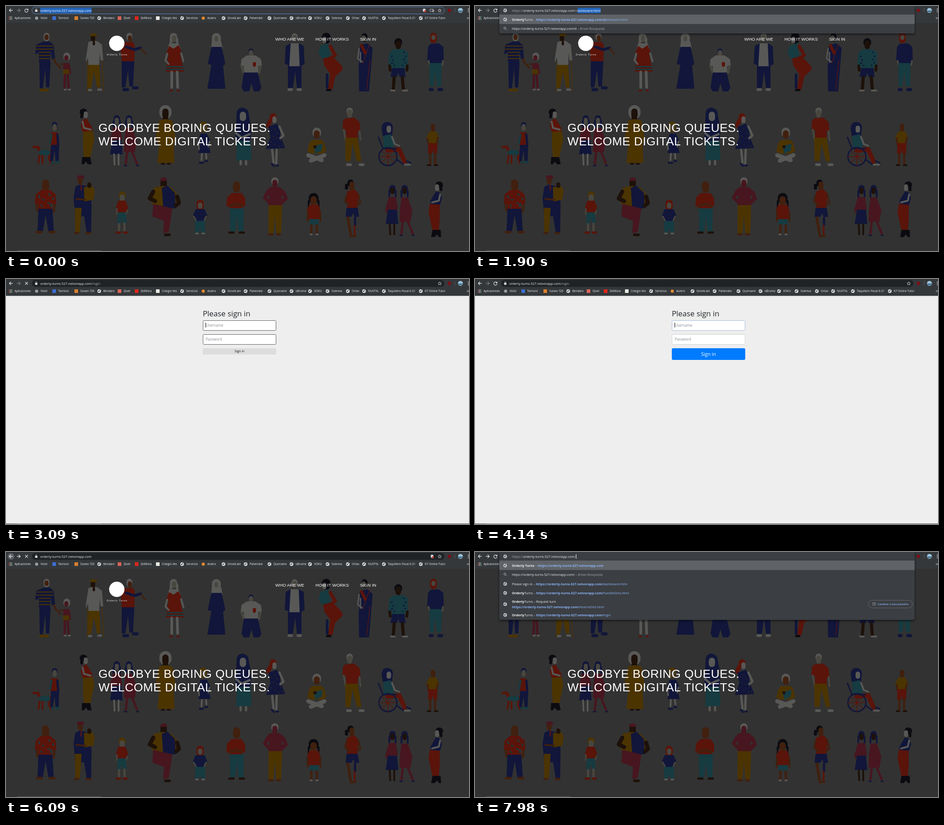
Animation, 1028 px wide and 545 px high, one loop 8 s. Source, as an HTML page:

```html
<!DOCTYPE html>
<html lang="es">
<head>
<meta charset="utf-8">
<title>Sign-in walk-through</title>
<style>
html, body { margin: 0; width: 100%; height: 100%; overflow: hidden; background: #323232; }
#stage { position: absolute; left: 0; top: 0; width: 1028px; height: 545px; overflow: hidden; font: 7.3px "Open Sans", "Noto Sans", sans-serif; color: #f1f3f4; }
#stage div, #stage svg { position: absolute; }
#stage svg { left: 0; top: 0; overflow: visible; }
.t { white-space: pre; line-height: 12px; }
.arial { font-family: "Liberation Sans", sans-serif; color: #fff; }
.slogan { letter-spacing: .5px; }
.label { letter-spacing: 1px; }
#home, #login { left: 0; top: 37px; width: 1028px; height: 508px; background: #323232; }
#login { background: #eee; }
#home > *, #login > * { margin-top: -37px; }
.box { box-sizing: border-box; left: 437px; width: 163px; border-radius: 2.5px; background: #fff; }
.field { height: 23px; border: 1px solid; }
#btn { top: 154px; text-align: center; }
#caret { left: 443px; top: 97px; width: 1px; height: 11px; background: #222; }
#panel { left: 54px; top: 0; width: 922px; background: #3b3e42; border-radius: 0 0 4px 4px; box-shadow: 0 2px 5px #0009; }
#hot { left: 0; top: 19px; width: 922px; height: 21px; background: #5f6367; }
i { font-style: normal; color: #a4a9ae; }
a { color: #8ab4f8; }
b { font-weight: 700; }
mark { background: #2265bd; color: #fff; padding: 1px 0; }
u { display: inline-block; width: 1px; height: 10px; margin-right: -1px; background: #fff; vertical-align: -2px; }
#pill { left: 819px; top: 107px; width: 97px; height: 16px; border: 1px solid #62666b; border-radius: 9px; }
</style>
</head>
<body>
<div id="stage">
  <div id="home">
    <svg id="crowd" width="1028" height="545"></svg>
    <div id="homeText"></div>
  </div>
  <div id="login">
    <div class="t" style="left:437px;top:66px;font-size:16.8px;line-height:22px;font-weight:500;color:#212529">Please sign in</div>
    <div class="box field" id="user" style="top:91.5px"></div>
    <div class="box field" id="pass" style="top:123px"></div>
    <div class="t" style="left:443.5px;top:96.5px;font-size:8.05px;color:#868c92">Username</div>
    <div class="t" style="left:443.5px;top:128px;font-size:8.05px;color:#868c92">Password</div>
    <div class="box" id="btn">Sign in</div>
    <div id="caret"></div>
    <div style="left:0;top:544px;width:1028px;height:1px;background:#444"></div>
  </div>
  <div style="left:25px;top:544px;width:186px;height:1px;background:#666"></div>
  <svg id="bar" width="1028" height="38"></svg>
  <div id="marks"></div>
  <div id="panel">
    <div id="hot"></div>
    <svg id="rowIcons" width="922" height="151"></svg>
    <div id="rows"></div>
    <div id="pill"><svg width="16" height="16"><path d="M9 5h6v5.500h-6zM12 5v2h3" fill="none" stroke="#9aa0a6" stroke-width=".8"/></svg>
      <div class="t" style="left:20px;top:1.500px;font-size:6px;font-weight:600;color:#8ab4f8">Cambiar a esta pestaña</div></div>
  </div>
  <div id="url" class="t" style="top:4px;font-size:7.4px"></div>
</div>
<script>
const $ = id => document.getElementById(id);
const show = (id, on) => { $(id).style.display = on ? '' : 'none'; };
const text = (x, y, html, size = 7.25, cls = '') =>
  `<div class="t ${cls}" style="left:${x}px;top:${y - 6}px;font-size:${size}px">${html}</div>`;

/* ---- crowd: "colour[stroke width] path" parts joined by | ---- */
const ink = { r: '#5a140a', n: '#11163a', y: '#4c3400', t: '#163b41', w: '#585856', g: '#48463f',
  b: '#1d110a', o: '#41200f', p: '#47161f', k: '#0b0b11', e: '#323232' };

const part = s => {
  const [, c, w, d] = s.match(/^(\w)([\d.]*) (.*)$/);
  return w
    ? `<path d="${d}" fill="none" stroke="${ink[c]}" stroke-width="${w}" stroke-linecap="round" stroke-linejoin="round"/>`
    : `<path d="${d}" fill="${ink[c]}"/>`;
};
const figure = (x, y, parts, flip = 1) =>
  `<g transform="translate(${x} ${y}) scale(${flip} 1)">${parts.split('|').map(part).join('')}</g>`;
const recolour = (parts, map) => parts.replace(/[a-z](?=[\d.]* M)/g, c => map[c] || c);

const expecting = 'k15 M8 10h2|k6 M5 18v3|w9 M14 13v6|r M6 28L16 24L22 34L29 46L28 54L8 56L3 40Z|w4 M7 31L10 45L25 49|y M8 54L30 52L33 70L24 112L10 112L8 84Z|k M6 110h18l3 16h-8l-5-6l-4 6h-5z';
const pair = 'n14 M18 8v5|n4 M11 14v13M25 14v13|g9 M18 11v6|p M10 28L26 28L30 54L24 58L10 58L4 64L2 56Z|n M8 56h20l3 32h-28z|w4 M12 88L13 111M22 88L22 111|n14 M45 8v5|n4 M38 14v13M52 14v13|g9 M45 11v6|p M38 29h14l10 28l-4 26h-24l1-30z|p5 M41 82L38 109M52 82L63 109|n3 M35 113h5M62 113h4';

const crowd = [
  [65, 59, 'w13 M25 7v6|o9 M25 9v3|n M19 20L32 20L41 28L44 58L37 60L34 42L33 65L8 65L8 45L0 48L2 27Z|y2 M3 30h36M2 37h38M9 44h24M9 51h24M9 58h24|n M9 65L34 65L31 122L24 122L22 80L17 124L10 124Z|y6 M12 128h5M22 128h5|o4 M42 59L45 67L56 79'],
  [122, 103, 'w15 M13 8v3|p9 M12 11v3|p M5 24h14l4 24h-4l-2-8v10h-12z|y M5 38h13v12h-13z|p5 M9 50l-1 29M15 50l2 29|w4 M8 83h3M17 83h3|o3 M5 27L-2 26'],
  [177, 59, 'b10 M16 10v5|y M10 2h13l3 6h-16z|w M6 21L13 19L25 19L36 27L39 62L33 62L31 45L30 72L6 72L5 55L1 66L0 60Z|b5 M18 21v5|y M6 72h24l3 50h-8l-7-36l-6 38h-8z|w5 M7 128h5M28 127h6|y1.5 M4 66V131M36 64L40 131'],
  [253, 59, 'w13 M21 7v5|o9 M22 11v4|r M8 22L28 20L33 28L32 64L4 64L1 30Z|n6 M14 32L32 38L46 34|o3 M46 35L57 48|n M4 64h28l-3 56h-8l-3-38l-6 40h-8z|n7 M9 127h8M30 123h8'],
  [352, 59, 'w16 M20 9v4|w5 M14 14v13M28 14v13|g9 M21 11v5|w M10 24h21l5 14h-29z|r M10 30L20 36L31 28L38 42L34 46L43 87L3 87L9 48L4 46Z|t3 M6 76h33M5 82h36|w4 M6 47L2 62L9 70M37 46L42 64|w6 M16 88L16 122M28 88L29 122|r4 M13 129h3M29 129h3'],
  [446, 59, 'w20 M21 11v9|w M11 20L32 20L35 36L9 36Z|g8 M21 12v4|n M10 32L33 32L41 70L36 74L41 125L1 125L10 72L2 70Z'],
  [520, 93, 'n11 M24 7v5|g10 M24 10v6|w M14 17h20l12 8l2 14l-8 2v14h-32v-14l-7-2l2-14z|r M28 32h7v8l-3.500 3l-3.500-3z|g5 M3 41L8 56L18 61M45 41L42 55L31 61|n M8 55h31l8 34l-5 8h-12l-5-18l-5 18h-12l-5-8z'],
  [618, 59, 'w13 M23 8v4|g9 M23 10v5|n M14 24L32 24L43 30L45 70L38 74L38 76L8 76L8 72L1 70L3 30Z|w M14 24L32 24L34 75L11 75Z|n M8 75h30v48h-10l-4-36l-5 36h-11z|w6 M10 127h6M30 127h6'],
  [695, 59, 'k19 M16 10v5|w9 M12 14v5|t M3 30L20 24L25 56L8 58Z|r7 M25 31L36 50L28 56|t6 M6 32L2 46L8 54|r M9 58L29 52L49 72L53 82L36 98L30 126L20 126L25 92L12 74Z|n6 M18 94V122|k5 M18 128h7'],
  [778, 59, 'k13 M18 8v6|g9 M16 11v4|n M8 28L24 24L36 34L34 60L28 131L6 131L5 80Z|r M7 28L13 25L24 46L18 50Z|w3 M6 36L3 58L14 66M9 44L9 66|p2 M29 27L14 68M30 62L23 126'],
  [849, 72, 'k17 M22 8v2|b12 M22 11v7|t M12 24h22l10 8l-1 26l-6 4v6h-29v-6l-8-2l2-28z|n3 M7 40h1M10 48h1M7 55h2M13 60h1M34 31h1M38 40h1M34 47h1M37 54h1M31 60h1|b6 M3 61L4 71M42 61L41 71|n M8 66h28l2 20h-13l-3-10l-3 10h-14z|b7 M13 87L11 111M31 87L33 111|w4 M6 116h8M32 116h10'],
  [935, 59, 'r15 M14 8v8|g9 M14 10v2|n M8 25L26 24L36 32L37 62L33 68L4 68L0 62L2 32Z|g4 M3 63L6 72M35 63L34 72|t M5 68h27l-1 52h-9l-4-34l-4 34h-8z|n7 M7 127h4M26 127h6'],
  [58, 257, 'r5 M3 57L13 56|r6 M13 58L19 68|r10 M20 70L40 69|r4 M17 74L14 92M23 74v18M39 72L37 82L42 93M42 72L44 92|t11 M20 69h15|r2 M44 66L47 55|n12 M50 7v2|g9 M50 10v6|r M42 24h14l4 30h-19z|t4 M43 29L40 48|n5 M56 29L58 52|n M42 52h18l-1 36h-7l-2-24l-4 24h-6z|t5 M44 91h4M54 90h5'],
  [163, 226, expecting],
  [228, 242, pair],
  [332, 221, 'w27 M22 13v4|b14 M22 14v8|b M16 26h12v10h-12z|y M8 34L18 31L26 31L37 34L44 70L40 90L42 128L4 128L8 90L0 72Z|b4 M14 130h5M27 130h5'],
  [424, 257, 'y16 M14 8v7|g9 M15 11v4|n M8 27h14l8 16l-5 3l5 24h-27l6-26l-6 2z|w3 M2 46L5 62M28 44L25 56|w4 M11 72L10 86M20 72L21 82|n4 M6 92h8M18 88h5'],
  [505, 226, 'n M7 14Q8 0 20 0Q34 2 34 16L38 36L6 36Z|w14 M21 16v7|n M10 34L32 34L40 56L36 80L8 80L3 56Z|w5 M6 57L18 67L36 59|t M8 74h30l2 42l-34 2z|w5 M16 119v7M28 119v7'],
  [573, 238, 'r15 M20 8v4|r9 M13 18L9 28|w9 M23 12v6|n M10 30L28 24L36 36L36 50L47 78L4 80L14 54Z|y2 M16 40h0M24 36h0M30 44h0M20 52h0M28 56h0M36 62h0M16 64h0M24 70h0M34 74h0M41 73h0M10 74h0|w5 M34 30L43 50L36 56|w5 M18 82L21 110M28 82L27 112|n4 M17 113L22 118M27 117h4'],
  [665, 270, 'w19 M25 10v3|o13 M25 13v6|y M14 28L36 28L42 36L46 52L38 58L12 58L4 54L8 36Z|t M18 42L38 36L36 52L22 58Z|b7 M21 43h0|w9 M6 62L36 73M42 62L12 74'],
  [747, 226, 'w14 M16 7v2|g11 M16 10v7|r M6 24L26 22L38 32L40 50L34 54V68H8V50L0 48L1 30Z|g4 M3 49L7 72M38 52L40 72|y M6 67h28l8 52h-10l-10-40l-4 40h-11z|w6 M11 127h7M39 127h7'],
  [827, 257, 'n M7 16Q8 0 20 1Q32 2 32 14L30 32L10 34Z|w10 M23 14v6|t M10 32L27 28L35 42L33 58L12 60Z|w4 M30 34L36 50L46 54|r10 M20 64L46 62L58 89|n3 M1 78a20 20 0 1 0 40 0a20 20 0 1 0-40 0M0 35L10 60h30M40 84l16 12|r1.5 M2 78h38M21 59v38M8 65l26 26M34 65l-26 26|w4 M58 96h12|n3 M62 88L72 92'],
  [932, 261, 'o10 M16 6v7|y M8 18h15l6 12l-3 10v8h-20l-5-16z|o4 M4 34L6 48M27 32L24 46|r M6 44h20l-1 24h-8l-1-10l-3 10h-8z|o5 M10 68v22M21 68v22|b4 M4 93h6M20 93h6'],
  [64, 385, 'o16 M24 9v9|r M14 24L34 24L46 34L48 54L38 58V68H8V58L0 54L2 34Z|t3 M8 37l3 4M17 46h3M31 33l3 3M29 53l4 2M14 58l2 3M40 42l2 3M37 55l-2 6|o5 M4 57L6 70M44 57L42 72|n M8 66h31l3 50h-12l-6-36l-6 36h-12z|o6 M5 118h9M34 118h9'],
  [150, 377, 'o11 M15 7v7|p M8 0h14l2 7h-16z|n M4 25L14 20L30 24L40 58L30 90L4 92L0 50Z|p4 M17 22v10|y M23 26L42 24L47 34L44 54L24 58Z|b9 M35 20v3|o4 M6 52L26 54|y M3 72h15l-4 54h-10z|n M17 62h23l-1 64h-10l-6-38z|o5 M4 128h6M29 128h8'],
  [243, 413, 'y15 M15 7v2|g11 M15 11v5|r M6 20h16l6 14l-3 10l-3 4h-17l-4-12z|g3 M3 38v12M26 42l-2 8|t M5 46h18l2 24h-8l-3-12l-3 14h-7z|g5 M8 72v14M20 71v15|r5 M3 91h7M19 91h6'],
  [315, 380, 'b14 M35 9v10|p M27 6Q35-4 43 6L42 9L28 9Z|y M14 24L34 20L52 24L66 40L70 62L50 68L14 66L4 50Z|n M31 24L44 20L60 36L62 70L34 70Z|b9 M12 33L4 48L16 54M65 44L69 58L62 64|p M12 60L54 70L50 100L46 123L34 125L36 98L10 88Z|b6 M39 129h9'],
  [415, 431, 'r16 M16 8v8|g10 M16 11v4|n M6 21h20l6 14l-5 4v9h-22v-9l-5-4z|g3 M2 37L7 46M29 37L25 46|t M5 47h22v26h-8l-3-10l-3 10h-8z|w4 M7 75h4M21 75h4'],
  [487, 390, 'o16 M25 8v9|r M14 26L36 26L44 38L44 54L36 60H12L2 54L4 36Z|o5 M9 55L24 50L38 55|t M10 60h31l-1 51h-11l-3-34l-4 34h-11z|b5 M9 114h9M32 114h9'],
  [570, 381, 'w16 M27 8v2|p11 M27 11v7|p M16 22L38 22L50 32L56 48L44 60L42 64H14L12 58L0 46L8 30Z|e M9 44l5-4v10zM47 44l-5-4v10z|y M13 62h30l-2 62h-11l-3-40l-3 40h-11z|o5 M14 127h8M32 127h6'],
  [667, 416, 'k22 M16 11v2|o14 M16 14v6|k4 M5 18v16M27 18v16|r M6 26h21l4 14l-2 18h-25l-3-18z|o4 M3 42v20M31 42v20|t M7 58h20v12h-9l-1-4l-1 4h-9z|o5 M11 72v18M23 72v18|w4 M9 92h3M22 92h3'],
  [750, 385, 'k14 M15 8v2|k7 M6 14v6|o11 M18 11v9|r M8 27L24 23L33 32L30 64L8 66L5 40Z|o4 M6 36L3 50L12 58M32 34L37 52L29 59|n M6 64h25l3 20h-10l-3-8l-4 8h-13z|o6 M9 86L15 122|n5 M25 86V102|r4 M24 104v18|o5 M15 127h5M23 126h3'],
  [840, 397, recolour(pair, { g: 'b', w: 'b' })],
  [971, 388, recolour(expecting, { r: 'n', y: 'r' }), -1],
];
$('crowd').innerHTML = crowd.map(f => figure(...f)).join('') + '<circle cx="246" cy="83" r="17" fill="#fff"/>';
$('homeText').innerHTML =
  text(223.5, 108, 'Orderly Turns', 5.5, 'arial label') +
  [[598, 'WHO ARE WE'], [687, 'HOW IT WORKS'], [786, 'SIGN IN']].map(([x, s]) => text(x, 73.5, s, 9.7, 'arial')).join('') +
  ['GOODBYE BORING QUEUES.', 'WELCOME DIGITAL TICKETS.'].map((s, i) => text(205.3, 271 + 30 * i, s, 26.4, 'arial slogan')).join('');

/* ---- browser bar ---- */
const dot = (x, y, r, c) => `<circle cx="${x}" cy="${y}" r="${r}" fill="${c}"/>`;
const square = (x, y, c) => `<path d="M${x - 4} ${y - 4}h8v8h-8z" fill="${c}"/>`;
const line = (d, c = '#e8eaed', w = 1.2, id = '') => `<path id="${id}" d="${d}" fill="none" stroke="${c}" stroke-width="${w}"/>`;
const globe = (x, y, c, hole) => dot(x, y, 4, c) +
  `<path transform="translate(${x} ${y})" d="M-3-1l2.500 0l1 1.500l-1.500 2zM0-3l2.500 1l-1 1.500l-1.500-1zM1 2l1.500-1.500v1.500z" fill="${hole}"/>`;

const W = 'globe';
const marks = [[77, 'Nolvi', '#9a9ca0'], [116, 'Tarnivol', '#3b6fd4', 1], [165, 'Suivex 720', '#d9802c', 1], [216, 'Bendaro', W],
  [261, 'Qivel', '#d9645a', 1], [299, 'ZelMora', '#e0261c', 1], [346, 'Colegio Ves', '#e9e9e4', 1], [400, 'Servicios', W],
  [447, 'Aulero', '#e58a2e'], [492, 'Grovik.lan', W], [541, 'Palvendor', W], [594, 'Quorvane', W], [643, 'oBrume', W],
  [684, 'VOKU', W], [723, 'Solenva', W], [768, 'Ortav', W], [804, 'NUVTils', W], [848, 'Taquillero Fiscal 6-31', W], [930, 'K7 Online Tutor', W]];
let apps = '';
for (let i = 0; i < 9; i++) apps += dot(7.5 + i % 3 * 2.8, 24.2 + Math.floor(i / 3) * 2.8, 1, ['#d9655b', '#c9ccd0', '#7fae8a'][i % 3]);

$('bar').innerHTML = `<path d="M0 0h1028v37.500h-1028z" fill="#35383b"/>
  <rect id="ring" x="57.5" y="2" width="916" height="15.5" rx="7.75"/>
  ${dot(11, 9.7, 7.5, '#5b5f63').replace('<circle', '<circle id="hover"')}
  ${line('M15 9.700H7.500M11 6L7.300 9.700L11 13.400')}${line('M24 9.700H31.500M28 6L31.700 9.700L28 13.400', '#e8eaed', 1.2, 'fwd')}
  ${line('M48.200 8A3.600 3.600 0 1 0 48.900 10.500M48.900 6v2.700h-2.700', '#e8eaed', 1.2, 'reload')}
  ${line('M42.500 6.700l6 6M48.500 6.700l-6 6', '#e8eaed', 1.2, 'stop')}
  <g id="lock"><path d="M64.700 8.800h5v4h-5z" fill="#e8eaed"/>${line('M65.700 9V7.800a1.500 1.500 0 0 1 3 0V9', '#e8eaed', .8)}</g>
  <g id="info">${line('M63.700 9.700a3.400 3.400 0 1 0 6.800 0a3.400 3.400 0 1 0-6.800 0M67.100 9v3M67.100 7.300v1', '#e8eaed', .8)}</g>
  <g id="shield"><path d="M-3-3L0-4L3-3V1Q2 3 0 4Q-2 3-3 1Z" fill="#d0d2d4"/>${dot(2, 2, 2.2, '#c4372f')}</g>
  ${line('M941.500 7h7v5h-7zM947 9h3v4h-3z', '#d0d2d4', .8, 'device')}
  ${line('M963 6.200l1.100 2.400 2.600.3-1.900 1.800.5 2.600-2.300-1.300-2.300 1.300.5-2.600-1.900-1.800 2.600-.3z', '#e8eaed', .8)}
  ${dot(984.5, 9.8, 3.8, '#7a1016')}${line('M997 5v9', '#5f6368', .8)}
  ${dot(1009, 9.7, 5.5, '#9fc3dc')}<path d="M1003.700 10h10.600a5.500 5.500 0 0 1-10.600 0" fill="#47708f"/>
  ${[6.5, 9.7, 12.9].map(y => dot(1026.5, y, .9, '#e8eaed')).join('')}
  ${line('M1023.500 25l1.800 2-1.800 2M1026 25l1.800 2-1.800 2', '#e8eaed', .8)}${apps}` +
  marks.map(([x, , c, sq]) => c === W ? globe(x - 9, 27, '#e8eaed', '#35383b') : sq ? square(x - 9, 27, c) : dot(x - 9, 27, 3.5, c)).join('');
$('marks').innerHTML = text(19, 27, 'Aplicaciones', 6.25) + marks.map(m => text(m[0], 27, m[1], 6.3)).join('');

/* ---- address bar and suggestions ---- */
const host = 'orderly-turns-527.nelvorapp.com', full = 'https://' + host, file = 'dashboard.html';
const dim = s => `<i>${s}</i>`, bold = s => `<b>${s}</b>`, sel = s => `<mark>${s}</mark>`, cursor = '<u></u>';
const link = (tail = '', typed = '') => dim(' – ') + `<a>${bold(full + typed)}${tail}</a>`;
const brand = bold('Orderly') + 'Turns';
const search = q => `${full}/${q}` + dim(' – Brixel Búsqueda');
const entry = dim('https://') + host;

const allRows = [
  [30, bold('Orderly Turns') + link()], [50, search('')],
  [71, 'Please sign in' + link(file, '/')], [91, brand + link('handleSlots.html', '/')],
  [110, brand + ' – Request turn'], [122, `<a>${bold(full + '/')}reserveSlot.html</a>`],
  [140, brand + link('login', '/')],
];
const typing = q => ({
  url: entry + dim('/' + q) + sel(file.slice(q.length)),
  rows: [[30, brand + link(file.slice(q.length), '/' + q)], [50, search(q)]],
});
const opened = { url: entry + dim('/') + cursor, rows: allRows };

/* ---- timeline: each row changes part of the state ---- */
const picked = { ring: 1, url: sel(host) };
const steps = [
  [0, { page: 'home', icon: 'lock', tools: 2, fwd: 0, load: 0, hover: 0, caret: 0, style: 0, rows: null, ...picked }],
  [820, { url: entry + cursor }],
  [1180, opened],
  [1670, { url: entry + dim('/') }],
  [1900, typing('d')],
  [2000, typing('da')],
  [2660, typing('das')],
  [2860, { rows: null, ring: 0, icon: 'info', url: host + dim('/' + file) }],
  [2910, { load: 1 }],
  [3090, { page: 'login', icon: 'lock', tools: 0, caret: 1, url: host + dim('/login') }],
  [3140, { style: .25 }], [3180, { style: .5 }], [3220, { style: .8 }],
  [3260, { style: 1, load: 0 }],
  [3640, { caret: 0 }], [4140, { caret: 1 }], [4680, { caret: 0 }], [5210, { caret: 1 }],
  [5610, { hover: 1 }],
  [5730, { caret: 0 }],
  [5930, { load: 1, fwd: 1, tools: 1, url: host }],
  [6090, { page: 'home' }],
  [6130, { load: 0, tools: 2 }],
  [6450, { hover: 0 }],
  [6620, { ring: 1 }],
  [6680, picked],
  [7550, { url: entry + cursor }],
  [7900, opened],
];

const mix = (a, b, k) => `rgb(${a.map((v, i) => Math.round(v + (b[i] - v) * k))})`;

function draw(s) {
  const open = !!s.rows;
  show('home', s.page === 'home');
  show('login', s.page === 'login');
  show('panel', open);
  show('lock', s.icon === 'lock');
  show('info', s.icon === 'info');
  show('stop', s.load);
  show('reload', !s.load);
  show('hover', s.hover);
  show('caret', s.caret);
  show('shield', s.tools);
  show('device', s.tools === 2);
  $('shield').setAttribute('transform', `translate(${s.tools === 2 ? 928.5 : 946} 9.7)`);
  $('fwd').style.stroke = s.fwd ? '#e8eaed' : '#7d8286';
  $('ring').style.stroke = s.ring ? '#5b87b8' : 'none';
  $('ring').style.fill = s.ring ? '#36393d' : '#202326';
  $('url').style.left = (open ? 82 : 76) + 'px';
  $('url').innerHTML = s.url;

  if (open) {
    const many = s.rows === allRows;
    $('panel').style.height = (many ? 151 : 61) + 'px';
    show('pill', many);
    $('rows').innerHTML = s.rows.map(([y, html]) => text(28, y, html)).join('');
    $('rowIcons').innerHTML = [9.7, 30].concat(many ? [71, 91, 116, 140] : []).map(y => globe(13, y, '#c6c9cc', '#4a4d51')).join('') +
      line('M10 49a2.200 2.200 0 1 0 4.400 0a2.200 2.200 0 1 0-4.400 0M14 50.700l2.500 2.500', '#c6c9cc', .9);
  }

  const k = s.style, raw = !k;
  $('user').style.borderColor = mix([95, 95, 95], [165, 188, 216], k);
  $('pass').style.borderColor = mix([95, 95, 95], [206, 212, 218], k);
  Object.assign($('btn').style, {
    height: raw ? '14px' : '26px', lineHeight: raw ? '13px' : '26px', fontSize: raw ? '7.1px' : '10.7px',
    borderRadius: raw ? '0' : '3px', background: mix([221, 221, 221], [0, 123, 255], k), color: mix([20, 20, 20], [255, 255, 255], k),
  });
}

let last = -1;
function tick() {
  const t = performance.now() % 8000;
  const n = steps.filter(([at]) => at <= t).length;
  if (n !== last) {
    last = n;
    draw(Object.assign({}, ...steps.slice(0, n).map(([, change]) => change)));
  }
  requestAnimationFrame(tick);
}
tick();
</script>
</body>
</html>
```
